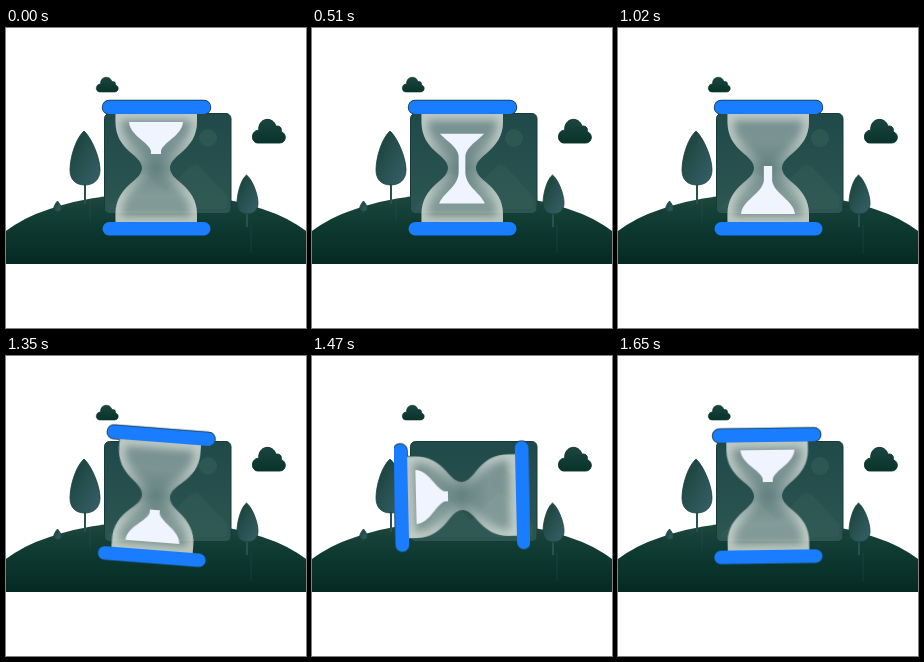
Recreate the animation shown at these times as an HTML page. Size 300 by 300 pixels, loop 1680 ms.

```html
<!DOCTYPE html>
<html lang="en">
<head>
<meta charset="utf-8">
<title>Hourglass</title>
<style>
  html, body { margin: 0; width: 100%; height: 100%; overflow: hidden; background: #fff; }
  svg { display: block; width: 100%; height: 100%; }

  .spin {
    transform-origin: 150px 140px;
    animation: spin 1680ms infinite;
  }
  .sand {
    fill: #eff4ff;
    animation: fall 1680ms linear infinite;
  }

  /* The glass waits for the sand, then flips half a turn. */
  @keyframes spin {
    0% { transform: rotate(0deg); }
    75.1% { transform: rotate(0deg); animation-timing-function: cubic-bezier(.9, 0, .1, .97); }
    100% { transform: rotate(180deg); }
  }

  /* Full top, both halves, thin thread, full bottom. */
  @keyframes fall {
    0% {
      d: path("M123 94 L177 94 C176 108 157 114 155 123 L155 124 C155 125 155 126 155 126 L145 126 C145 126 145 125 145 124 L145 123 C143 114 124 108 123 94 Z");
    }
    37.5% {
      d: path("M129 108.5 L171 108.5 C163 114 154 120 153 129 L153 150 C154 167 171 173 177 187 L123 187 C129 173 146 167 147 150 L147 129 C146 120 137 114 129 108.5 Z");
    }
    50% {
      d: path("M146.5 126 L153.5 126 C153.5 126 153.5 126 153.5 126 L153.5 150 C156 166 175 172 177 186 L123 186 C125 172 144 166 146.5 150 L146.5 126 C146.5 126 146.5 126 146.5 126 Z");
    }
    75%, 100% {
      d: path("M145 154 L155 154 C155 154 155 155 155 156 L155 157 C157 166 176 172 177 186 L123 186 C124 172 143 166 145 157 L145 156 C145 155 145 154 145 154 Z");
    }
  }
</style>
</head>
<body>
<svg viewBox="0 0 300 300">
  <defs>
    <linearGradient id="hill" x1="0" y1="165" x2="0" y2="236" gradientUnits="userSpaceOnUse">
      <stop stop-color="#20483f"/>
      <stop offset=".45" stop-color="#0e3a31"/>
      <stop offset="1" stop-color="#042a22"/>
    </linearGradient>
    <linearGradient id="leaf" x1="0" y1="0" x2="1" y2="1">
      <stop stop-color="#163f36"/>
      <stop offset="1" stop-color="#38616a"/>
    </linearGradient>
    <linearGradient id="card" x1="0" y1="0" x2="0" y2="1">
      <stop stop-color="#20494a"/>
      <stop offset="1" stop-color="#2c5651"/>
    </linearGradient>
    <linearGradient id="cloud" x1="0" y1="0" x2="0" y2="1">
      <stop stop-color="#1b4540"/>
      <stop offset="1" stop-color="#08332a"/>
    </linearGradient>
    <!-- Mirrored about the waist, where the glass is clearest. -->
    <linearGradient id="haze" x1="0" y1="140" x2="0" y2="194" gradientUnits="userSpaceOnUse" spreadMethod="reflect">
      <stop stop-color="#fff" stop-opacity=".28"/>
      <stop offset=".5" stop-color="#fff" stop-opacity=".4"/>
      <stop offset="1" stop-color="#fff" stop-opacity=".38"/>
    </linearGradient>
    <linearGradient id="glow" x1="0" y1="140" x2="0" y2="194" gradientUnits="userSpaceOnUse" spreadMethod="reflect">
      <stop stop-color="#eef1e8" stop-opacity=".15"/>
      <stop offset=".5" stop-color="#eef1e8" stop-opacity=".55"/>
      <stop offset="1" stop-color="#eef1e8" stop-opacity=".65"/>
    </linearGradient>
    <filter id="soft" x="-20%" y="-20%" width="140%" height="140%">
      <feGaussianBlur stdDeviation="4"/>
    </filter>
    <path id="glass" d="M109.500 86V94C109.500 108 116 117 124 124C130 129 136 134 136 140C136 146 130 151 124 156C116 163 109.500 172 109.500 186V194H191V186C191 172 184 163 176 156C170 151 164 146 164 140C164 134 170 129 176 124C184 117 191 108 191 94V86Z"/>
    <clipPath id="inside"><use href="#glass"/></clipPath>
    <clipPath id="ground"><rect y="160" width="300" height="76"/></clipPath>
    <clipPath id="view"><rect x="82" y="60" width="136" height="160"/></clipPath>
    <g id="bars">
      <rect x="96.500" y="72.500" width="108" height="13.500" rx="6.750"/>
      <rect x="96.500" y="194" width="108" height="13.500" rx="6.750"/>
    </g>
    <path id="puff" d="M4 15C-1 15-1 7 4.500 7C4-1 14-2 16 4.500C19 4 20 6 19.500 8C23.500 9 23 15 18.500 15Z"/>
  </defs>

  <!-- Dark backing that shows only where the glass leaves the scenery. -->
  <g clip-path="url(#view)">
    <g class="spin" fill="#27504d" stroke="#12332f" stroke-width="1.500">
      <use href="#glass"/>
      <use href="#bars"/>
    </g>
  </g>

  <g fill="url(#cloud)" stroke="#0b352c" stroke-width=".6">
    <use href="#puff" transform="translate(90 49)"/>
    <use href="#puff" transform="translate(246 91) scale(1.500 1.600)"/>
  </g>

  <ellipse cx="150" cy="237" rx="170" ry="72" fill="url(#hill)" clip-path="url(#ground)"/>

  <g fill="none" stroke="#2a5052" stroke-width="2">
    <path d="M79 145V176M241 178V199"/>
    <path d="M51.500 180V186M245 196V225M84 172V194" opacity=".2"/>
  </g>
  <g fill="url(#leaf)" stroke="#17423c" stroke-width=".8">
    <path d="M78 103C85 109 94 129 94 142C94 152 87 157 79 157C70 157 64 152 64 142C64 129 70 110 78 103Z"/>
    <path d="M240.500 147C246 151 252 166 252 175C252 182 248 186 241 186C235 186 231 182 231 175C231 166 235 151 240.500 147Z"/>
    <path d="M51.500 173C54 176 56 179 55 182Q51.500 185 48 182C47 179 49 176 51.500 173Z"/>
  </g>

  <rect x="98.500" y="85.500" width="126.500" height="100" rx="5" fill="url(#card)" stroke="#173c38"/>
  <circle cx="202" cy="110" r="9" fill="#35605a" opacity=".55"/>
  <path d="M102 180L132 149Q138 143 144 149L159 164L183 140Q189 134 195 140L221 168V177Q221 181 217 181H104Z" fill="#3a625d" opacity=".35"/>

  <g clip-path="url(#view)">
    <g class="spin">
      <use href="#glass" fill="url(#haze)"/>
      <g clip-path="url(#inside)">
        <use href="#glass" fill="none" stroke="url(#glow)" stroke-width="12" filter="url(#soft)"/>
      </g>
      <path class="sand"/>
      <use href="#bars" fill="#1a7cff"/>
    </g>
  </g>
</svg>
</body>
</html>
```
